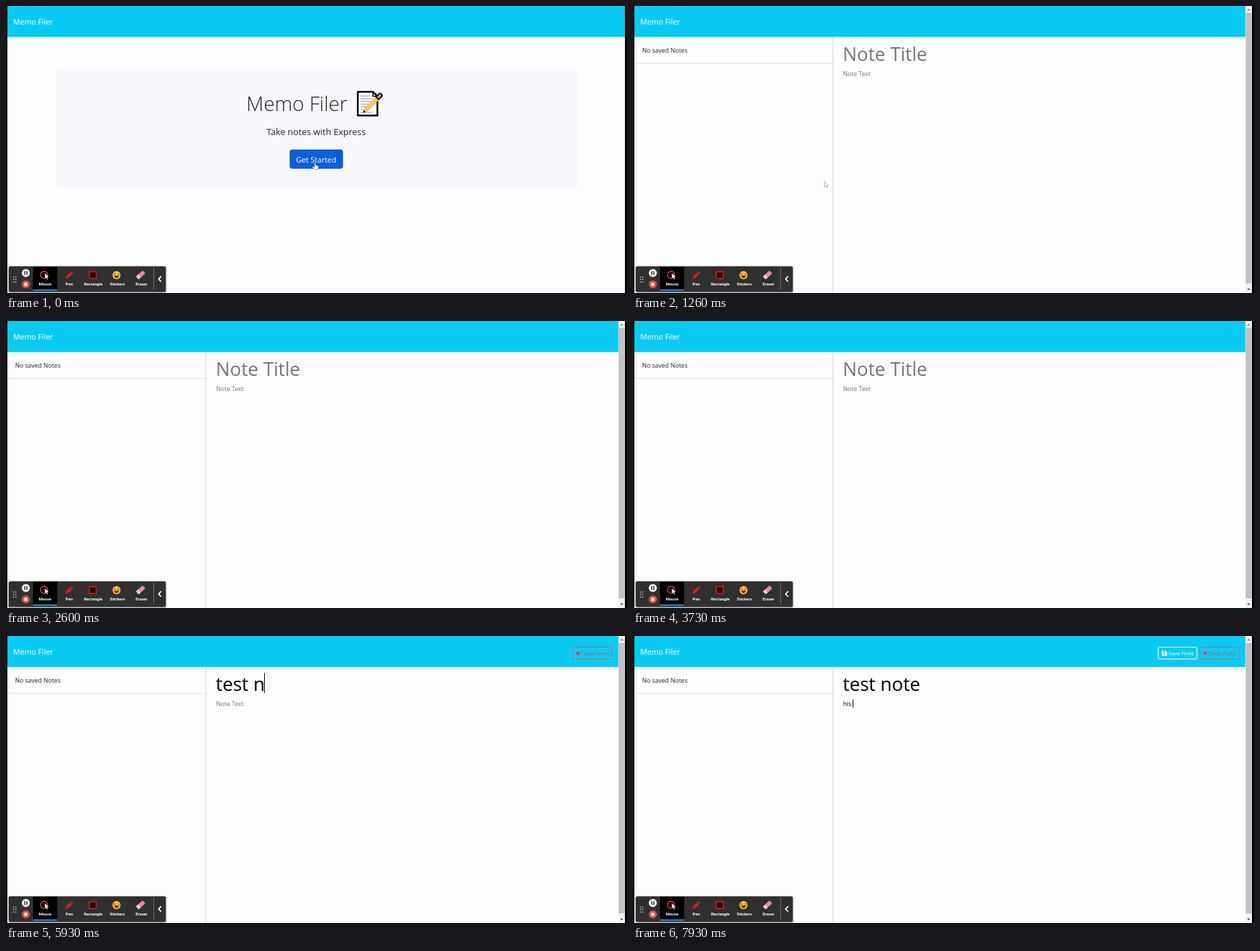
Animation, 902 px wide and 418 px high, one loop 8000 ms. Source, as an HTML page:

```html
<!DOCTYPE html>
<html lang="en">
<head>
<meta charset="utf-8">
<title>Memo Filer</title>
<style>
  html, body { margin: 0; width: 100%; height: 100%; overflow: hidden; background: #000; }
  svg { display: block; width: 100vw; height: 100vh; font-family: "Open Sans", "Noto Sans", sans-serif; }
  text { white-space: pre; }
  .tools text { font: 700 6px Roboto, sans-serif; fill: #fff; text-anchor: middle; }
</style>
</head>
<body>
<svg viewBox="0 0 902 418">
  <rect width="902" height="418"/>
  <rect x="2" width="897" height="418" fill="#fdfdfd"/>
  <rect x="2" width="897" height="45.3" fill="#0bcaf1"/>
  <text x="10.6" y="27.4" font-size="11" fill="#fff">Memo Filer</text>

  <g id="home">
    <rect x="72" y="92" width="758" height="173" rx="2" fill="#f8f8fc"/>
    <text x="349" y="153.3" font-size="29.2" font-weight="300" fill="#212529">Memo Filer</text>
    <g stroke="#000" stroke-linejoin="round">
      <path d="M511 125H533L539.5 131.500V159.500H511Z" fill="#fafafa" stroke-width="2.600"/>
      <path d="M533 125V131.500H539.500" fill="none" stroke-width="1.500"/>
      <path d="M515 131H529M515 135H534M515 139H534M515 143H531M515 147H527M515 151H524M515 155H531" stroke="#b3b6b9" stroke-width="1.300"/>
      <path d="M519 155L521 149L539 131L543 135L525 153Z" fill="#f7c65b" stroke="#e3a93e" stroke-width=".7"/>
      <path d="M519 155L520 152L522 154Z" stroke-width=".6"/>
      <path d="M537.500 132.500L541.500 128.500Q544 126.500 545.500 128.500Q547 130.500 545 132.500L541.500 136Z" fill="#ee9f9a" stroke-width="2"/>
    </g>
    <text x="450.5" y="188" font-size="13" font-weight="500" fill="#212529" text-anchor="middle">Take notes with Express</text>
    <rect x="412" y="209" width="77.500" height="28" rx="4" fill="#0b5ed7"/>
    <text x="450.5" y="227.700" font-size="11.1" fill="#fff" text-anchor="middle">Get Started</text>
  </g>

  <g id="notes">
    <text x="13.2" y="68" font-size="9" fill="#212529">No saved Notes</text>
    <path d="M3 83.500H290" stroke="#e3e3e5"/>
    <path d="M290.500 45.300V418" stroke="#d5d5d8"/>
    <text id="title" x="304.800" y="79.700" font-size="27.2"></text>
    <text id="body" x="305" y="102.200" font-size="9"></text>
    <rect id="caret" width="1"/>
    <g id="save">
      <rect x="763" y="16.300" width="56" height="17.200" rx="1.800" fill="none" stroke="#fff"/>
      <path d="M768 21.500h5.500l2 2v5.500h-7.500z" fill="#fff"/>
      <path d="M769.500 22.500h3.300v1.800h-3.300z" fill="#0bcaf1"/>
      <circle cx="771.700" cy="26.800" r="1.100" fill="#0bcaf1"/>
      <text x="777.700" y="28" font-size="7.900" fill="#fff">Save Note</text>
    </g>
    <g id="clear">
      <rect x="823.500" y="16.300" width="57" height="17.200" rx="1.800" fill="none" stroke="#a97085"/>
      <path d="M829 23.200l4.200 4.200m0-4.200l-4.200 4.200" stroke="#d9404f" stroke-width="2"/>
      <text x="835.600" y="28" font-size="7.800" fill="#cb5064">Clear Form</text>
    </g>
    <rect x="889.500" width="9.500" height="418" fill="#f1f1f1"/>
    <rect x="890" y="10" width="8.500" height="394" fill="#c1c1c1"/>
    <path d="M892 6.500h4.600l-2.300-2.600z" fill="#777"/>
    <path d="M892 411.500h4.600l-2.300 2.600z" fill="#444"/>
  </g>

  <g class="tools">
    <rect x="3" y="378.500" width="230.500" height="39.500" rx="3.500" opacity=".25"/>
    <rect x="4" y="379.300" width="228" height="37.200" rx="2.500" fill="#303030"/>
    <path d="M11 394v9M14.300 394v9" stroke="#ccc" stroke-width="1.500" stroke-dasharray="1.500 2.100"/>
    <circle cx="28.800" cy="388.900" r="5.900" fill="#f3f3f3"/>
    <path d="M27.300 386.300v5.200M30.300 386.300v5.200" stroke="#222" stroke-width="1.400"/>
    <circle cx="28.800" cy="405.300" r="5.900" fill="#df4b4b"/>
    <rect x="26.500" y="403" width="4.600" height="4.600" fill="#fff"/>
    <rect x="39.300" y="379.800" width="35" height="34.800"/>
    <rect x="39.300" y="412.800" width="35" height="1.800" fill="#2c9df0"/>
    <circle cx="55.300" cy="391.700" r="5.200" fill="none" stroke="#e8484d" stroke-width="1.300"/>
    <path d="M56.300 388.800v8.600l2-1.800 1.300 2.800 1.500-.7-1.300-2.700h2.600z" fill="#fff" stroke="#000" stroke-width=".4"/>
    <path d="M86.300 397.500l1.500-4.500 5.200-4.800 2.700 2.700-5 5.200z" fill="#e51d24"/>
    <path d="M93.600 387.700l1.700-1.500 2.300 2.300-1.500 1.700z" fill="#e51d24"/>
    <path d="M88 393.800l2.500 2.100M91 392l2-2" stroke="#851015" stroke-width=".7"/>
    <rect x="121.100" y="387" width="10" height="9.800" fill="#260808" stroke="#e3181e" stroke-width="1.500"/>
    <circle cx="160.500" cy="392" r="5.900" fill="#f8c43c"/>
    <path d="M156.500 390.500q1.300-1.500 2.500 0m3 0q1.300-1.500 2.500 0" fill="none" stroke="#5b3512" stroke-width=".9"/>
    <path d="M157 392.600h7q-.5 3.700-3.500 3.700t-3.500-3.700" fill="#7a3019"/>
    <path d="M156 391.800h1.400m6.200 0h1.400" stroke="#ef6648" stroke-width="1.500"/>
    <g transform="rotate(-42 195.500 391.700)">
      <rect x="189" y="388.700" width="13" height="6" rx="1" fill="#e58d9b"/>
      <rect x="189" y="388.700" width="4.500" height="6" rx="1" fill="#f3c0c7"/>
    </g>
    <text x="56.800" y="407">Mouse</text>
    <text x="91.800" y="407">Pen</text>
    <text x="126.800" y="407">Rectangle</text>
    <text x="161.800" y="407">Stickers</text>
    <text x="196.800" y="407">Eraser</text>
    <path d="M214.600 381v32" stroke="#777" stroke-width=".9"/>
    <path d="M225.300 393.700l-3.600 3.900 3.600 3.900" fill="none" stroke="#fff" stroke-width="1.700"/>
  </g>

  <circle id="ring" r="19" fill="none" stroke="#e2525c" stroke-width="1.700"/>
  <path id="hand" d="M-.9 .5Q0-.6.9.5V4L3.800 4.600Q5 5 4.800 6.500L4 10H-1.800L-4 6.700Q-3.900 5.300-2.500 5.900L-.9 7Z" fill="#fff" stroke="#24406e" stroke-width=".5"/>
  <path id="arrow" d="M0 0V8.200L1.900 6.500 3.200 9.200 4.500 8.600 3.200 5.900H5.700Z" fill="#fff" stroke="#909096" stroke-width=".7"/>
</svg>
<script>
const LOOP = 8000, PAGE = 930, TAB = 6730;
const $ = id => document.getElementById(id);
const [home, notes, title, body, caret, save, clear, ring, hand, arrow] =
  ["home", "notes", "title", "body", "caret", "save", "clear", "ring", "hand", "arrow"].map($);

const titleKeys = [4860, 5000, 5130, 5200, 5400, 5930, 6060, 6130, 6330];
const bodyKeys = [7530, 7660, 7800, 7930];
const path = [[60, 449, 228], [460, 440.500, 223.500], [760, 440.500, 223.500], [1260, 278, 255.500], [1460, 278, 255.500], [1600, 291, 235]];

const show = (el, on) => el.style.display = on ? "" : "none";
const clamp = v => Math.min(1, Math.max(0, v));
const ease = v => v * v * (3 - 2 * v);
const typed = (text, keys, t) => text.slice(0, keys.filter(k => k <= t).length);

function pointer(t) {
  let [, x, y] = path[0];
  for (let i = 1; i < path.length; i++) {
    const [a, ax, ay] = path[i - 1], [b, bx, by] = path[i];
    if (t < a) break;
    const k = ease(clamp((t - a) / (b - a)));
    x = ax + (bx - ax) * k;
    y = ay + (by - ay) * k;
  }
  return [x, y];
}

function fill(el, text, hint) {
  el.textContent = text || hint;
  el.setAttribute("fill", text ? "#000" : "#757575");
}

function caretOn(t) {
  if (t < 4860) return [2060, 3130, 4130].some(s => t >= s && t < s + (s > 4000 ? 470 : 530));
  const last = [...titleKeys, TAB, ...bodyKeys].filter(k => k <= t).pop();
  return (t - last) % 1060 < 530;
}

function place(el, x, y) {
  el.setAttribute("transform", `translate(${x} ${y})`);
}

function draw(t) {
  const onNotes = t >= PAGE;
  show(home, !onNotes);
  show(notes, onNotes);

  const head = typed("test note", titleKeys, t), note = typed("his ", bodyKeys, t);
  fill(title, head, "Note Title");
  fill(body, note, "Note Text");
  show(clear, head);
  show(save, note);

  const inBody = t >= TAB, field = inBody ? body : title, text = inBody ? note : head;
  const width = text ? field.getComputedTextLength() : 0;
  caret.setAttribute("x", Math.round(+field.getAttribute("x") + width - .6));
  caret.setAttribute("y", inBody ? 92.500 : 54);
  caret.setAttribute("height", inBody ? 12 : 29);
  show(caret, caretOn(t));

  const [x, y] = pointer(t);
  place(hand, x, y);
  place(arrow, x, y);
  show(hand, !onNotes);
  show(arrow, onNotes && x < 290);
  place(ring, x + .7, y + .5);
  show(ring, t >= 660 && t < PAGE);
  ring.setAttribute("opacity", .9 * (1 - clamp((t - 730) / 200)));
}

const start = performance.now();
function tick() {
  draw((performance.now() - start) % LOOP);
  requestAnimationFrame(tick);
}
tick();
</script>
</body>
</html>
```
